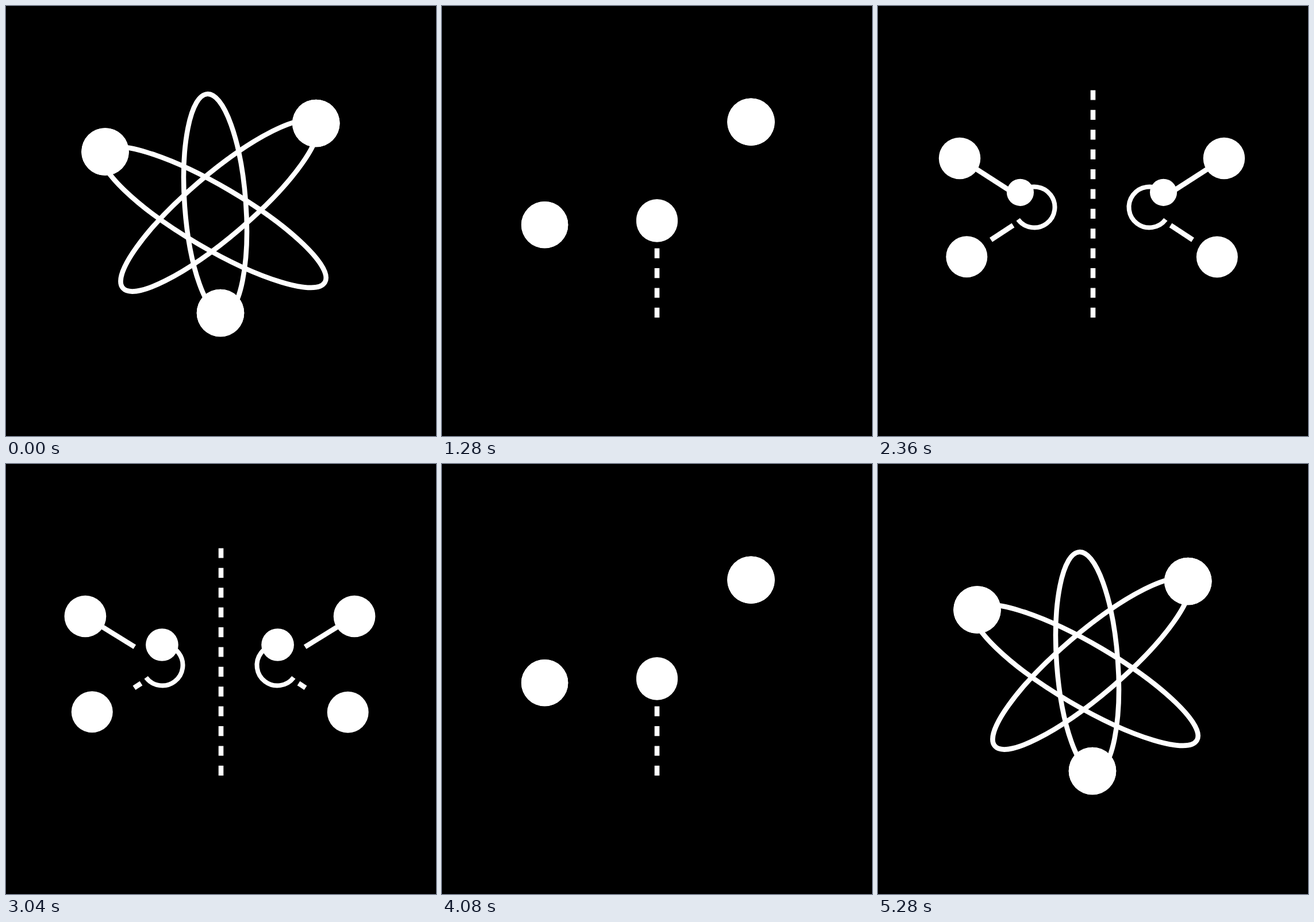
These frames come from a looping animation (748x748 px, 5320 ms). An HTML page:

```html
<!DOCTYPE html>
<html lang="en">
<head>
<meta charset="utf-8">
<title>Atom to mirrored molecules</title>
<style>
  html, body { margin: 0; width: 100%; height: 100%; overflow: hidden; background: #000; }
  svg { display: block; width: 100vw; height: 100vh; }
</style>
</head>
<body>
<svg id="stage" viewBox="0 0 748 748" fill="none" stroke="#fff"></svg>
<script>
const LOOP = 5320, STEP = 40, TURN = 5360;
const AXIS = 372;
const HUB = { d: 100, y: 350, r: 35.5, start: 37 };

// Twins are placed by their distance from the mirror axis
const FOUNTAIN = [[0, 93], [170, 93], [335, 330], [214, 440]];
const SCOOP = [[172.5, 253.5], [155, 520], [330, 715], [373.4, 373.3]];
const SWOOP = [[539.3, 204], [450, 90], [400, 120], [372, 265]];
const ORBITS = [
  { cx: 361.5, cy: 367.3, rx: 224, ry: 54, tilt: 210.4 },
  { cx: 370.5, cy: 347.7, rx: 220, ry: 54.3, tilt: -40.5 },
  { cx: 364, cy: 345, rx: 192.4, ry: 53.2, tilt: 85.8 }
];

const mix = (a, b, k) => a + (b - a) * k;
const part = (t, a, b) => Math.max(0, Math.min(1, (t - a) / (b - a)));
const smooth = k => k * k * (3 - 2 * k);
const slowDown = k => 1 - (1 - k) ** 1.65;
const overshoot = k => 1 + 2.7 * (k - 1) ** 3 + 1.7 * (k - 1) ** 2;

// Point on a cubic Bezier curve
function along([a, b, c, d], s) {
  const u = 1 - s;
  return [0, 1].map(i =>
    u ** 3 * a[i] + 3 * u * u * s * b[i] + 3 * u * s * s * c[i] + s ** 3 * d[i]);
}

function set(el, attrs) {
  for (const name in attrs) el.setAttribute(name, attrs[name]);
}
function make(tag, parent, attrs = {}) {
  const el = document.createElementNS("http://www.w3.org/2000/svg", tag);
  set(el, attrs);
  return parent.appendChild(el);
}
const show = (el, on) => set(el, { visibility: on ? "visible" : "hidden" });

const stage = document.getElementById("stage");
const orbits = ORBITS.map(({ cx, cy, rx, ry, tilt }) => make("path", stage, {
  d: `M${rx} 0A${rx} ${ry} 0 0 0 ${-rx} 0A${rx} ${ry} 0 0 0 ${rx} 0`,
  transform: `translate(${cx} ${cy}) rotate(${tilt})`,
  "stroke-width": 8.5, pathLength: 100
}));
const trail = make("path", stage, { "stroke-width": 8.6, "stroke-dasharray": "17.2 17.2" });

const halves = [-1, 1].map(side => {
  const group = make("g", stage, { transform: `translate(${AXIS}) scale(${side} 1)` });
  const ball = () => make("circle", group, { fill: "#fff", stroke: "none" });
  const rod = () => make("line", group, { "stroke-width": 8.7 });
  return {
    side,
    ring: make("circle", group, {
      r: HUB.r, "stroke-width": 8, pathLength: 100,
      transform: `translate(${HUB.d} ${HUB.y}) rotate(${HUB.start})`
    }),
    upperRod: rod(), lowerRod: rod(),
    riser: ball(), scooper: ball(), swooper: ball()
  };
});

function growRod(el, from, to, k) {
  show(el, k > 0);
  set(el, { x1: from[0], y1: from[1], x2: mix(from[0], to[0], k), y2: mix(from[1], to[1], k) });
}

function rise(t) {
  return mix(534, 93, part(t, 800, 1480) ** 2.9);
}

// Climbs the axis, then falls to both sides; the right twin is slightly ahead
function drawRiser({ riser, side }, t) {
  const r = mix(41.3, 36, smooth(part(t, 800, 1280)));
  const x = mix(373, 374, part(t, 800, 1280)) - AXIS;
  if (t < 1480) return set(riser, { cx: side * x, cy: rise(t + side * 1.5), r });
  const s = slowDown(part(t, 1480, 2420));
  const [d, y] = along(FOUNTAIN, Math.min(1, s + side * 0.01 * (1 - s) / 0.35));
  set(riser, { cx: d + side * 6 * Math.sin(Math.PI * s), cy: y, r });
}

// Swings below into the centre, splits and then traces the ring
function drawScooper({ scooper, ring, side }, t) {
  const s = part(t, 780, 1900) ** 2.2;
  const k = part(t, 2160, 2500), turn = slowDown(k);
  show(ring, k > 0);
  set(ring, { "stroke-dasharray": `${100 * turn} 100` });

  const angle = (HUB.start + 360 * turn) * Math.PI / 180;
  const penD = HUB.d + HUB.r * Math.cos(angle), penY = HUB.y + HUB.r * Math.sin(angle);
  const [x, y] = along(SCOOP, s);
  const split = smooth(part(t, 1820, 2160));
  set(scooper, {
    cx: k > 0 ? penD : split * penD + side * (x - AXIS) * (1 - split),
    cy: k > 0 ? penY : mix(y, penY, split),
    r: mix(41.3, 37.8, s) * (1 - k ** 1.84)
  });
}

// Swings over to the axis, then splits into the outer upper pair
function drawSwooper({ swooper, upperRod, side }, t) {
  const s = part(t, 1100, 1920) ** 3.3;
  const [x, y] = along(SWOOP, s);
  const k = part(t, 1919, 2520);
  const d = 215 * overshoot(k) + side * (x - AXIS);
  set(swooper, { cx: d, cy: y, r: mix(mix(41.3, 38.3, s), 36, slowDown(k)) });
  growRod(upperRod, [d, y], [129, 330], smooth(part(t, 2240, 2350)));
}

function draw(t) {
  const trim = 100 * smooth(part(t, 80, 780));
  orbits.forEach(el => {
    show(el, trim < 100);
    set(el, { "stroke-dasharray": `0 ${trim} ${100 - trim} 100` });
  });
  set(trail, { d: `M374 542V${Math.max(146, rise(t))}` });
  show(trail, t > 800);

  halves.forEach(half => {
    drawRiser(half, t);
    drawScooper(half, t);
    drawSwooper(half, t);
    growRod(half.lowerRod, [137, 381.5], [214, 432], smooth(part(t, 2280, 2440)));
  });
}

function frame() {
  const t = Math.floor((performance.now() % LOOP) / STEP) * STEP;
  draw(Math.min(t, TURN - t));
  requestAnimationFrame(frame);
}
frame();
</script>
</body>
</html>
```
